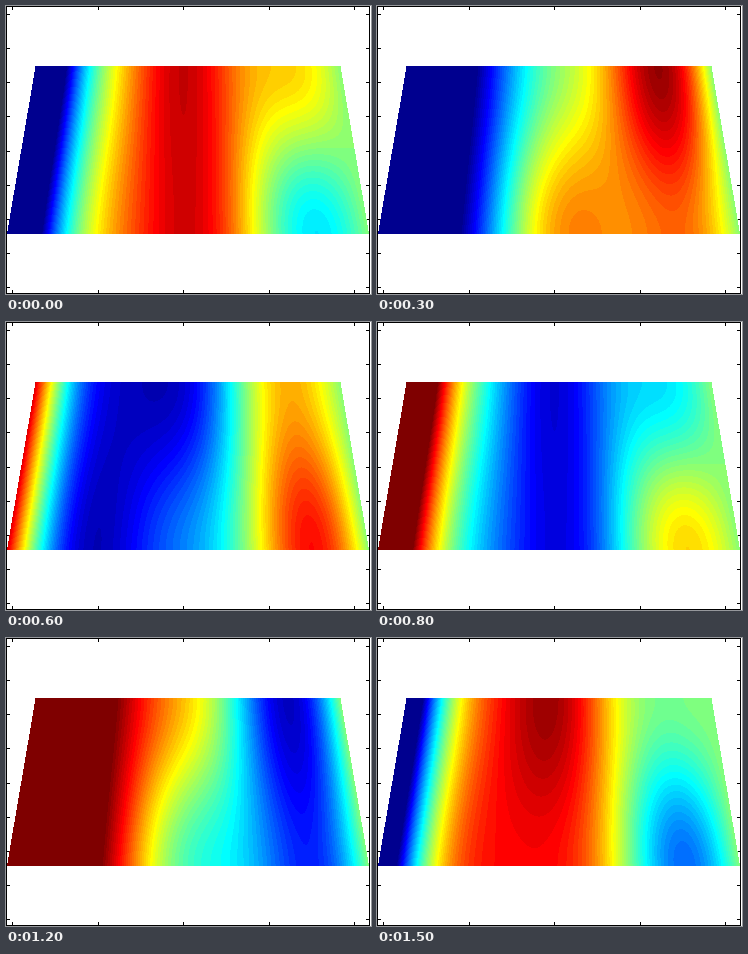
These frames come from a looping animation (365 by 288 pixels, 1600 ms). A matplotlib script:

```python
import matplotlib.pyplot as plt
import numpy as np
from matplotlib.animation import FuncAnimation

W, H, DPI = 365, 288, 64
FRAMES, INTERVAL = 16, 100
TOP, BOTTOM = 60, 227          # first and last pixel row of the plate

# Complex wave: a driven left edge that dies away, plus standing modes
# sin(n pi u). Each mode has a mean and a part varying from top to bottom.
EDGE, DECAY = -2.45 - 1.3j, 4
MODES = [(.89 + 0j, .067 - .091j),
         (.418 - .64j, -.134 - .033j),
         (-.034 + .058j, .084 + .112j),
         (.079 - .193j, -.077 - .003j),
         (.064 + .04j, .026 - .023j)]


def jet64():
    k = np.arange(1, 65) / 16
    rgb = [np.minimum(k - 1.5, 4.5 - k),
           np.minimum(k - .5, 3.5 - k),
           np.minimum(k + .5, 2.5 - k)]
    return np.clip(np.transpose(rgb), 0, 1)


def wave_field(u, v):
    z = EDGE * (1 - u) ** DECAY
    for n, (mean, tilt) in enumerate(MODES, 1):
        z = z + (mean + tilt * np.cos(np.pi * v)) * np.sin(n * np.pi * u)
    return z


def axes_box():
    """White stage with a black frame and inward ticks."""
    box = np.ones((H, W, 3))
    right, bottom, tick = 363, 287, 4
    box[[0, bottom], :right + 1] = 0
    box[:, [0, right]] = 0
    for k in range(5):
        x = round(6.4 + 85.5 * k)
        box[:tick, x] = box[-tick:, x] = 0
    for k in range(9):
        y = round(7.8 + 34.2 * k)
        box[y, :tick] = box[y, right - tick + 1:right + 1] = 0
    return box


# Plate coordinates: u runs across, v runs down
y, x = np.mgrid[0:H, 0:W].astype(float)
v = (y - TOP) / (BOTTOM - TOP)
left, right = 29 - 28.5 * v, 334 + 28.5 * v
u = (x - left) / (right - left)
plate = (v >= 0) & (v <= 1) & (u >= 0) & (u <= 1)

wave = wave_field(u[plate], v[plate])
palette = jet64()
stage = axes_box()


def picture(n):
    value = (wave * np.exp(-2j * np.pi * n / FRAMES)).real
    level = np.clip(np.floor((value + 1) * 32), 0, 63).astype(int)
    pixels = stage.copy()
    pixels[plate] = palette[level]
    return pixels


fig = plt.figure(figsize=(W / DPI, H / DPI), dpi=DPI, facecolor="white")
ax = fig.add_axes([0, 0, 1, 1])
ax.axis("off")
image = ax.imshow(picture(0), extent=(0, W, H, 0), interpolation="nearest",
                  aspect="auto")


def update(n):
    image.set_data(picture(n))
    return [image]


anim = FuncAnimation(fig, update, frames=FRAMES, interval=INTERVAL,
                     repeat=True, repeat_delay=0)
plt.show()
```
